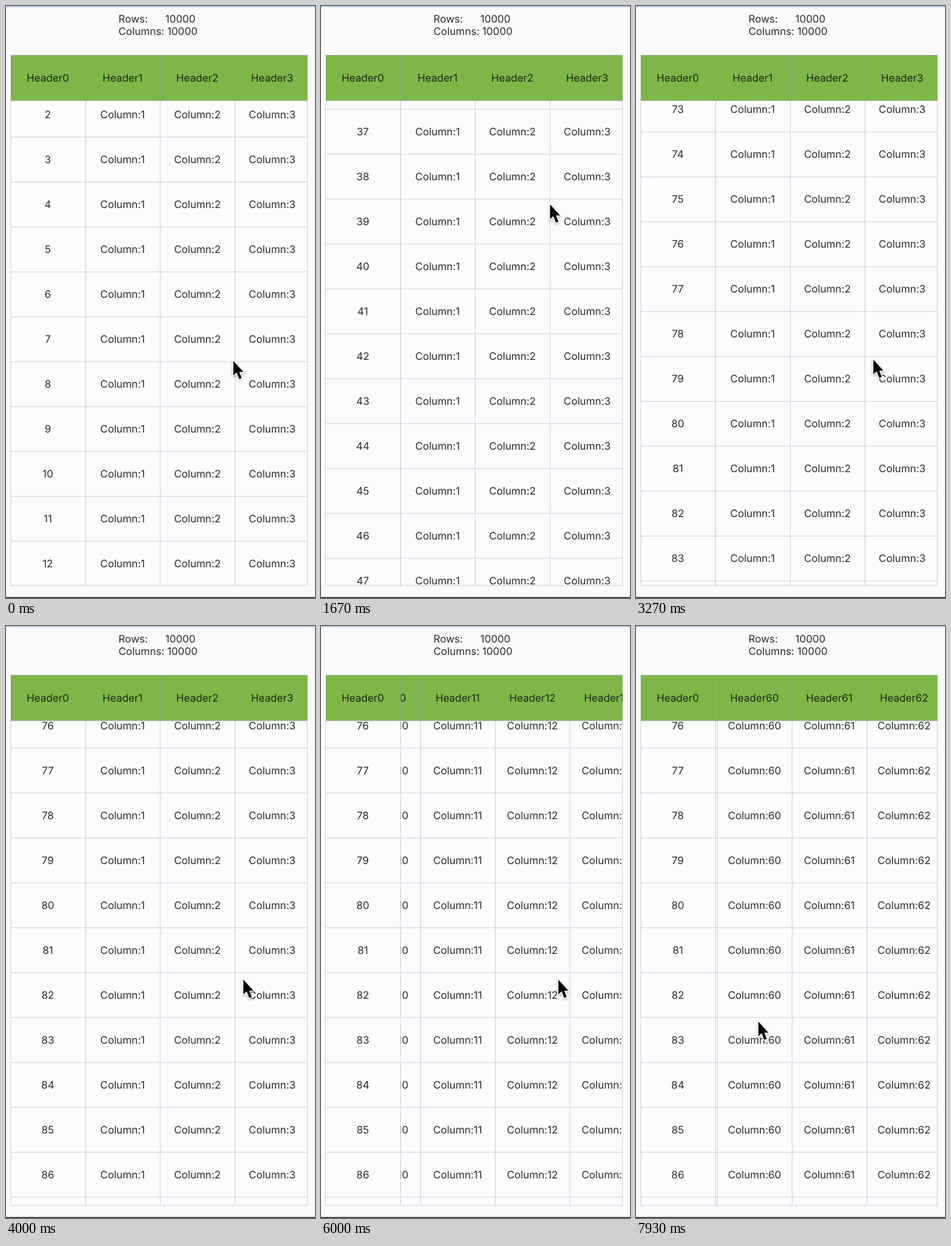
Recreate the animation shown at these times as an HTML page with a canvas. Size 524 by 1002 pixels, loop 8000 ms.

```html
<!DOCTYPE html>
<html lang="en">
<head>
<meta charset="utf-8">
<title>Scrolling table</title>
<style>
  html, body { margin: 0; width: 100%; height: 100%; overflow: hidden; background: #fbfbfd; }
  canvas { display: block; }
</style>
</head>
<body>
<canvas id="stage" width="524" height="1002"></canvas>
<script>
const ctx = document.getElementById('stage').getContext('2d');
const LOOP = 8000;
const LEFT = 8, RIGHT = 511.5, TOP = 83.5, BODY = 160, BOTTOM = 981;
const COL = 126.8, ROW = 76, LINE = 1.3;
const FIXED = LEFT + COL;
const INK = '#2c2c2e', HEAD_INK = '#1d2a14';
const GRID = '#d6d5de', HEAD_GRID = '#8fae7c', GREEN = '#7eb649';

const progress = (t, from, to) => Math.min(1, Math.max(0, (t - from) / (to - from)));
const easeOut = (u, power) => 1 - (1 - u) ** power;
const smooth = u => u * u * (3 - 2 * u);
const mix = (a, b, u) => a + (b - a) * u;
// Back-and-forth hand movement: 0 at rest, 2 at the far end of a swipe.
const swing = (ms, period) => 1 - Math.cos(2 * Math.PI * ms / period);

const FLICK_END = 2470, DRAG = 4740, DRAG_END = 5200, SWIPES = 6130;

// Repeated flicks gather speed, then the last fling runs out.
function scrollY(t) {
  const s = Math.min(t, FLICK_END) / 1000;
  return 166 + 1270 * s + 183 * s * s + 1386 * easeOut(progress(t, FLICK_END, 4000), 2.4);
}

// One slow drag with its fling, then a burst of swipes.
function scrollX(t) {
  return 362.5 * progress(t, DRAG, DRAG_END) ** 2
    + 871.5 * easeOut(progress(t, DRAG_END, 6000), 1.5)
    + 6244 * smooth(progress(t, 6000, 7930));
}

function pointer(t) {
  if (t < DRAG) {
    const ms = Math.min(t, FLICK_END), reach = swing(ms, 670.6);
    const back = smooth(progress(t, FLICK_END, 3000));
    return [
      mix(385 + 0.0215 * ms - 16.5 * reach, 402, back),
      mix(600 - 132.5 * reach, 598, back)
    ];
  }
  if (t < SWIPES) {
    const reach = swing(920 * progress(t, DRAG, DRAG + 920), 920);
    return [402 - 190 * reach, 598 + 18.5 * reach];
  }
  const reach = swing(t - SWIPES, 800);
  return [403 - 196 * reach, 598 + 35 * reach + 0.02 * (t - SWIPES)];
}

function rect(x, y, w, h, color) {
  ctx.fillStyle = color;
  ctx.fillRect(x, y, w, h);
}

const hLine = (y, color) => rect(LEFT, y - LINE / 2, RIGHT - LEFT, LINE, color);
const vLine = (x, y0, y1, color) => rect(x - LINE / 2, y0, LINE, y1 - y0, color);

function label(text, x, y, color, align = 'center') {
  ctx.fillStyle = color;
  ctx.textAlign = align;
  ctx.fillText(text, x, y);
}

const cellLabel = (text, left, y, color) => label(text, left + COL / 2 - 0.5, y, color);

function clipped(x, y, w, h, paint) {
  ctx.save();
  ctx.beginPath();
  ctx.rect(x, y, w, h);
  ctx.clip();
  paint();
  ctx.restore();
}

function drawPage() {
  rect(0, 0, 524, 1002, '#fbfbfd');
  rect(0, 1, 524, 2, '#e3ebf9');
  rect(0, 0, 524, 1, '#9fb8dc');
  rect(0, 999, 524, 1, '#f0f0f2');
  rect(0, 1000.5, 524, 1.5, '#202022');
  label('Rows:      10000', 190.7, 27.5, INK, 'left');
  label('Columns: 10000', 190.7, 49.3, INK, 'left');
  rect(LEFT, BODY, RIGHT - LEFT, BOTTOM - BODY, '#fcfcfe');
}

function eachColumn(x, paint) {
  const place = c => FIXED + (c - 1) * COL - x;
  for (let c = Math.floor(x / COL) + 1; place(c) < RIGHT; c++) paint(c, place(c));
}

function eachRow(y, paint) {
  const place = r => BODY + r * ROW - y;
  for (let r = Math.floor(y / ROW); place(r) < BOTTOM; r++) paint(r, place(r));
}

function drawBody(x, y) {
  clipped(LEFT, BODY, RIGHT - LEFT, BOTTOM - BODY, () => eachRow(y, (r, top) => {
    hLine(top + ROW, GRID);
    cellLabel(r, LEFT, top + 44, INK);
  }));
  clipped(FIXED, BODY, RIGHT - FIXED, BOTTOM - BODY, () => eachColumn(x, (c, left) => {
    vLine(left, BODY, BOTTOM, GRID);
    eachRow(y, (r, top) => cellLabel('Column:' + c, left, top + 44, INK));
  }));
  for (const edge of [LEFT, FIXED, RIGHT - 0.5]) vLine(edge, BODY, BOTTOM, GRID);
  hLine(BOTTOM, GRID);
}

function drawHeader(x) {
  rect(LEFT, TOP, RIGHT - LEFT, BODY - TOP, GREEN);
  cellLabel('Header0', LEFT, 127.7, HEAD_INK);
  clipped(FIXED, TOP, RIGHT - FIXED, BODY - TOP, () => eachColumn(x, (c, left) => {
    vLine(left, TOP, BODY, HEAD_GRID);
    cellLabel('Header' + c, left, 127.7, HEAD_INK);
  }));
  vLine(FIXED, TOP, BODY, HEAD_GRID);
  hLine(TOP, HEAD_GRID);
  hLine(BODY, HEAD_GRID);
}

const arrow = new Path2D('M0 0V25L5.6 19.8L10 31L14.2 29.2L10 18.7H17Z');

function drawPointer([x, y]) {
  ctx.save();
  ctx.translate(x + 0.5, y + 0.5);
  ctx.lineJoin = 'round';
  ctx.lineWidth = 3;
  ctx.strokeStyle = '#fff';
  ctx.shadowColor = 'rgba(0, 0, 0, 0.3)';
  ctx.shadowBlur = 4;
  ctx.shadowOffsetY = 2;
  ctx.stroke(arrow);
  ctx.shadowColor = 'transparent';
  ctx.fillStyle = '#000';
  ctx.fill(arrow);
  ctx.restore();
}

function draw(t) {
  const x = scrollX(t);
  ctx.font = '17.5px Inter, "Open Sans", sans-serif';
  ctx.textRendering = 'geometricPrecision';
  drawPage();
  drawBody(x, scrollY(t));
  drawHeader(x);
  drawPointer(pointer(t));
}

// Fifteen steps a second, each starting on a multiple of 10 ms.
function tick() {
  const step = Math.floor((performance.now() % LOOP + 3.4) * 0.015) % 120;
  draw(Math.round(step * 20 / 3) * 10);
  requestAnimationFrame(tick);
}
tick();
</script>
</body>
</html>
```
